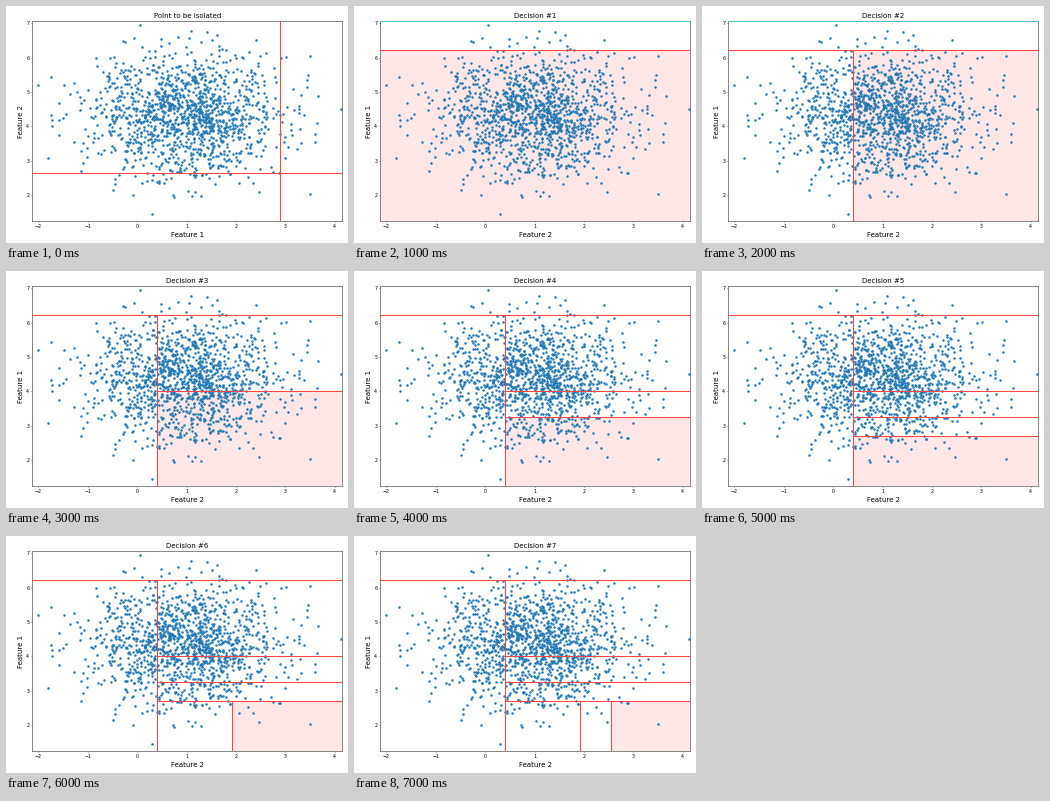
Animation, 342 px wide and 237 px high, one loop 8 s. Source, as a matplotlib script:

```python
import numpy as np
import matplotlib.pyplot as plt
from matplotlib.animation import FuncAnimation
from matplotlib.patches import Rectangle

W, H, DPI = 342, 237, 100
PX = 72 / DPI                       # points per pixel
LEFT, RIGHT, TOP, BOTTOM = 26, 336, 15, 215.3
XLIM, YLIM = (-2.13, 4.15), (1.25, 7.06)
TARGET = (2.895, 2.65)
CUTS = [("y", 6.23, "low"), ("x", 0.4, "high"), ("y", 4.02, "low"),
        ("y", 3.27, "low"), ("y", 2.7, "low"), ("x", 1.93, "high"),
        ("x", 2.54, "high")]

# A few extreme points that set the outline of the cloud
FAR = [(-2.0, 5.2), (-1.75, 5.45), (-1.8, 3.1), (0.05, 6.95), (0.3, 1.45),
       (3.5, 6.05), (3.65, 4.1), (3.6, 3.55), (3.5, 2.05), (4.13, 4.5)]


def make_cloud(n=1380, reach=2.85):
    z = np.random.default_rng(11).normal(size=(n, 2))
    z = (z - z.mean(axis=0)) / z.std(axis=0)
    z = z[np.hypot(*z.T) < reach]
    return np.vstack([z * (0.98, 0.93) + (0.97, 4.32), FAR, [TARGET]]).T


fig = plt.figure(figsize=(W / DPI, H / DPI), dpi=DPI, facecolor="white")
ax = fig.add_axes([LEFT / W, 1 - BOTTOM / H,
                   (RIGHT - LEFT) / W, (BOTTOM - TOP) / H])
ax.set(xlim=XLIM, ylim=YLIM, xticks=range(-2, 5), yticks=range(2, 8))
ax.tick_params(labelsize=4.7 * PX, length=1.3 * PX, width=0.5 * PX,
               pad=1.4 * PX)
for spine in ax.spines.values():
    spine.set(linewidth=0.8 * PX, edgecolor="#6a6a6a")

ax.plot(*make_cloud(), "o", ms=2.5 * PX, mew=0, color="#1f77b4", zorder=2)


def label(x, y, **kw):
    return fig.text(x / W, 1 - y / H, "", size=7.05 * PX, ha="center", **kw)


title = label(181.5, 12, va="baseline")
xlabel = label(181.5, 231, va="baseline")
ylabel = label(15, 115, va="center", rotation=90)
region = ax.add_patch(Rectangle((0, 0), 1, 1, color="#ffe7e7", lw=0, zorder=1))
top_edge = ax.axhline(YLIM[1], color="#4fbfc0", lw=PX, zorder=4,
                      clip_on=False)


def red_line(xs, ys):
    return ax.plot(xs, ys, color="#ff4444", lw=1.05 * PX, zorder=3)[0]


def split(box, axis, value, side):
    """Draw a cut across the box and return it with the side that is kept."""
    ends = {**box, axis: (value, value)}
    lo, hi = box[axis]
    kept = (lo, value) if side == "low" else (value, hi)
    return red_line(ends["x"], ends["y"]), {**box, axis: kept}


cross = [red_line([TARGET[0]] * 2, YLIM), red_line(XLIM, [TARGET[1]] * 2)]
cut_lines, boxes = [], [{"x": XLIM, "y": YLIM}]
for cut in CUTS:
    line, box = split(boxes[-1], *cut)
    cut_lines.append(line)
    boxes.append(box)


def draw(step):
    intro = step == 0
    title.set_text("Point to be isolated" if intro else f"Decision #{step}")
    xlabel.set_text("Feature 1" if intro else "Feature 2")
    ylabel.set_text("Feature 2" if intro else "Feature 1")
    for line in cross:
        line.set_visible(intro)
    for i, line in enumerate(cut_lines):
        line.set_visible(i < step)
    top_edge.set_visible(step in (1, 2))
    (x0, x1), (y0, y1) = boxes[step]["x"], boxes[step]["y"]
    region.set_bounds(x0, y0, x1 - x0, y1 - y0)
    region.set_visible(not intro)
    return [title, xlabel, ylabel, region, top_edge, *cross, *cut_lines]


anim = FuncAnimation(fig, draw, frames=len(boxes), interval=1000,
                     repeat=True, repeat_delay=0, blit=False)
plt.show()
```
